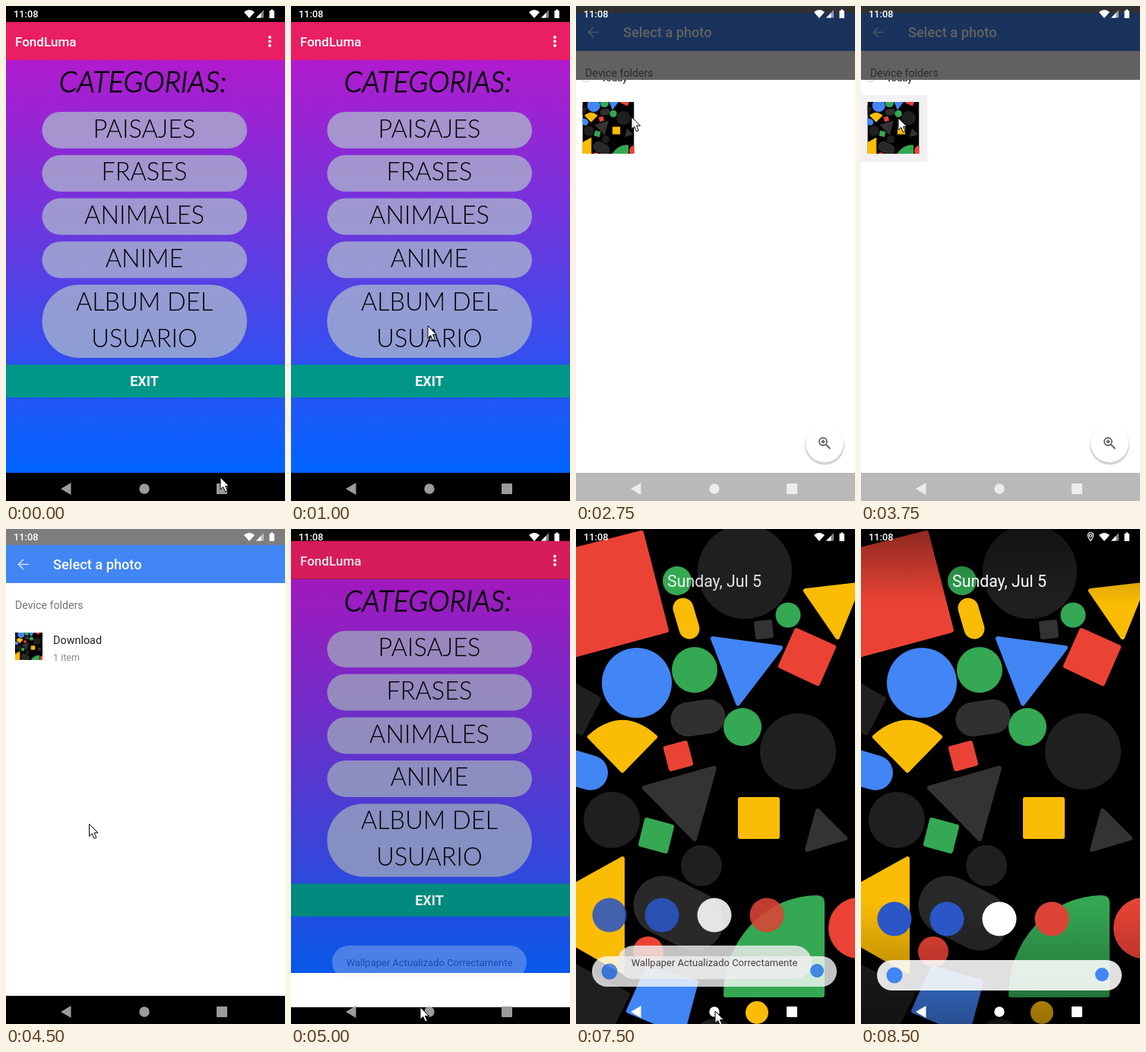
Recreate the animation shown at these times as an HTML page. Size 367 px wide and 650 px high, loop 8.75 s.

```html
<!DOCTYPE html>
<html lang="es">
<head>
<meta charset="utf-8">
<title>Wallpaper app</title>
<style>
html, body { margin: 0; width: 100%; height: 100%; overflow: hidden; background: #000; }
main { position: relative; width: 367px; height: 650px; overflow: hidden; }
main > svg { position: absolute; left: 0; top: 0; }
text { font-family: Roboto, sans-serif; white-space: pre; }
.mid { text-anchor: middle; }
.hand text { font: 300 32.5px Lato, sans-serif; }
.hand .head { font: italic 300 38px Lato, sans-serif; }
.med { font-weight: 500; }
</style>
</head>
<body>
<main>
<svg width="0" height="0">
  <defs>
    <linearGradient id="sky" x2="0" y2="1"><stop stop-color="#b01bce"/><stop offset=".45" stop-color="#643ae0"/><stop offset="1" stop-color="#0064ff"/></linearGradient>
    <linearGradient id="shade" x2="0" y2="1"><stop stop-opacity=".4"/><stop offset=".15" stop-opacity="0"/><stop offset=".75" stop-opacity="0"/><stop offset="1" stop-opacity=".4"/></linearGradient>
    <g id="wall" stroke-linejoin="round" stroke-linecap="round"></g>
    <symbol id="thumb" viewBox="0 177 367 367"><rect y="177" width="367" height="367"/><use href="#wall"/></symbol>
    <path id="back" d="M30 46.5H17M23 40l-6.500 6.500 6.500 6.500" fill="none" stroke-width="1.700"/>
  </defs>
</svg>

<svg id="home" width="367" height="650">
  <rect width="367" height="650"/>
  <use href="#wall"/>
  <rect id="scrim" width="367" height="650" fill="url(#shade)"/>
  <text id="date" class="mid" x="182" y="76" font-size="21.300" fill="#fff">Sunday, Jul 5</text>
  <g id="dock">
    <circle cx="44" cy="512" r="22.500" fill="#2a56c6"/>
    <circle cx="113" cy="512" r="22.500" fill="#2a56c6"/>
    <circle cx="182" cy="512" r="22.500" fill="#fff"/>
    <circle cx="251" cy="512" r="22.500" fill="#db4437"/>
    <rect x="21" y="566" width="322" height="40" rx="20" fill="#fff" opacity=".88"/>
    <circle cx="44" cy="586" r="10.500" fill="#4285f4"/>
    <circle cx="317" cy="585" r="9" fill="#4285f4"/>
  </g>
</svg>

<svg id="app" width="367" height="650">
  <rect width="367" height="650"/>
  <rect y="71" width="367" height="542" fill="url(#sky)"/>
  <rect y="21" width="367" height="50" fill="#e91e63"/>
  <text class="med" x="12" y="53" font-size="17" fill="#fff">FondLuma</text>
  <g fill="#fff"><circle cx="347" cy="41" r="2"/><circle cx="347" cy="46.500" r="2"/><circle cx="347" cy="52" r="2"/></g>
  <g id="menu" class="hand mid"><text class="head" x="180" y="113" stroke="#000" stroke-width=".9">CATEGORIAS:</text></g>
  <rect y="471" width="367" height="43" fill="#009688"/>
  <text class="mid" x="182" y="499" font-size="18" font-weight="700" fill="#fff">EXIT</text>
</svg>

<svg id="picker" width="367" height="650">
  <rect width="367" height="650"/>
  <rect width="367" height="613" fill="#fff"/>
  <rect width="367" height="21" fill="#7d7d7d"/>
  <rect y="21" width="367" height="50" fill="#4285f4"/>
  <use href="#back" stroke="#c6daff"/>
  <text class="med" x="62" y="53" font-size="18.200" fill="#fff">Select a photo</text>
  <text x="12" y="105" font-size="14.200" fill="#757575">Device folders</text>
  <rect id="press" y="126" width="367" height="56" fill="#e8e8e8"/>
  <use href="#thumb" x="12" y="136" width="36" height="36"/>
  <text x="62" y="151" font-size="14.400" fill="#212121">Download</text>
  <text x="62" y="173" font-size="12.500" fill="#8a8a8a">1 item</text>
</svg>

<svg id="page" width="367" height="650">
  <rect width="367" height="650" fill="#b9b9b9"/>
  <rect y="21" width="367" height="592" fill="#fff"/>
  <use href="#back" stroke="#757575"/>
  <text class="med" x="62" y="53" font-size="18.200" fill="#333">Download</text>
  <circle cx="13" cy="94" r="5.500" fill="none" stroke="#ccc"/>
  <text class="med" x="33" y="98.500" font-size="13" fill="#333">Today</text>
  <rect id="chosen" y="117" width="87" height="88" fill="#f1f1f3"/>
  <use href="#thumb" x="8.500" y="126" width="68" height="68"/>
  <circle cx="327" cy="576" r="26.500" opacity=".08"/>
  <circle cx="327" cy="577" r="25.500" opacity=".1"/>
  <circle cx="327" cy="574" r="25" fill="#fff"/>
  <path d="M329 576l5.500 5.500M322.500 572h5M325 569.500v5" stroke="#666" stroke-width="1.800"/>
  <circle cx="325" cy="572" r="5" fill="none" stroke="#666" stroke-width="1.800"/>
</svg>

<svg id="system" width="367" height="650">
  <g fill="#fff">
    <text class="med" x="10" y="15" font-size="12.800">11:08</text>
    <path d="M313 8Q320 2 327 8L320 16Z"/>
    <path d="M339 5V15.500H329Z" opacity=".5"/><path d="M335.500 9V15.500H329Z"/>
    <path d="M346.500 6H348.500V4.500H351V6H353V16H346.500Z"/>
    <path id="pin" d="M302 15.500C294 5 302 4.500 302 4.500S310 5 302 15.500ZM302 7a1.700 1.700 0 1 0 .01 0Z" fill="none" stroke="#fff" stroke-width="1.200"/>
  </g>
  <ellipse id="ripple" cx="182" cy="632" fill="#fff" opacity=".16"/>
  <g id="nav"><path d="M72 634L85.500 626V642Z"/><circle cx="182" cy="634" r="6.700"/><rect x="277" y="627" width="14" height="14" rx="1"/></g>
  <g id="toast">
    <rect x="54" y="547" width="256" height="44" rx="22" fill="#eee" opacity=".91"/>
    <text class="mid" x="182" y="574" font-size="13" fill="#333">Wallpaper Actualizado Correctamente</text>
  </g>
  <path id="cursor" d="M0 0V16L3.700 12.500 6.500 19 9.300 17.800 6.600 11.500H11.500Z" fill="#fff" stroke="#000"/>
</svg>
</main>

<script>
const $ = id => document.getElementById(id);
const RED = '#ea4335', BLUE = '#4285f4', GREEN = '#34a853', GOLD = '#fbbc05', DARK = '#1f1f1f', GREY = '#333';

// Wallpaper shapes
const dot = (c, x, y, r) => `<circle cx="${x}" cy="${y}" r="${r}" fill="${c}"/>`;
const path = (c, d) => `<path d="${d}" fill="${c}" stroke="${c}" stroke-width="6"/>`;
const poly = (c, pts) => path(c, `M${pts}Z`);
const pill = (c, d, w) => `<path d="${d}" stroke="${c}" stroke-width="${w}"/>`;
$('wall').innerHTML = [
  dot(DARK, 222, 56, 62), dot(DARK, 292, 292, 50), dot(DARK, 47, 382, 37), dot(DARK, 165, 442, 27), dot(DARK, 182, 670, 27),
  poly(DARK, '-5 203 30 223 7 268 -10 260'), poly(DARK, '-5 572 68 611 46 655 -10 655'),
  poly(RED, '-40 37 86 5 119 133 -40 176'),
  dot(GREEN, 133, 68, 19), pill(GOLD, 'M141 104L149 131', 27),
  poly(GOLD, '302 81 372 73 344 142'), dot(GREEN, 279, 113, 16.5),
  poly(GREY, '237 124 255 122 257 140 239 142'),
  poly(RED, '290 133 339 155 318 203 269 180'),
  dot(BLUE, 80, 202, 46), dot(GREEN, 156, 185, 30),
  poly(BLUE, '180 144 269 156 213 229'),
  pill('#303030', 'M147 250L174 246', 45), dot(GREEN, 219, 260, 25),
  path(GOLD, 'M18 273Q61 235 104 273L61 317Z'),
  pill(BLUE, 'M-15 310L19 320', 46),
  poly(RED, '118 288 144 281 151 308 125 315'),
  poly(GREY, '90 340 182 314 156 407'),
  path(GOLD, 'M216 355H265V404H216Z'),
  poly(GREY, '318 370 354 406 304 421'),
  poly(GREEN, '93 382 126 391 118 423 85 414'),
  poly(GOLD, '61 433 61 581 -70 506'),
  pill('#292929', 'M114 494L156 515', 77),
  path(GREEN, 'M197 612A121 128 0 0 1 316 484Q324 484 324 490V612Z'),
  dot(RED, 372, 524, 40), dot(RED, 95, 555, 20),
  poly(BLUE, '94 577 158 595 140 662 69 633'),
  dot(GOLD, 238, 635, 15)
].join('');

// Category buttons
[['PAISAJES'], ['FRASES'], ['ANIMALES'], ['ANIME'], ['ALBUM DEL', 'USUARIO']].forEach((lines, i) => {
  const y = 139 + i * 56.75, h = 48 * lines.length;
  $('menu').innerHTML += `<rect x="47.500" y="${y}" width="269.500" height="${h}" rx="${h / 2}" fill="#acb8cd" opacity=".75"/>` +
    lines.map((s, k) => `<text x="182" y="${y + 33.5 + k * 48}">${s}</text>`).join('');
});

const lerp = (keys, t) => {
  let i = 1;
  while (i < keys.length - 1 && t > keys[i][0]) i++;
  const a = keys[i - 1], b = keys[i];
  const k = Math.min(1, Math.max(0, (t - a[0]) / (b[0] - a[0])));
  return a.slice(1).map((v, j) => v + (b[j + 1] - v) * k);
};

// Each scene lists its layers: [id, shift, brightness, clip from top]
const scenes = [
  [0, ['app']],
  [1500, ['app', -12, .45], ['picker', 6, 1, 130]],
  [1750, ['picker']],
  [2750, ['picker', -12, .38], ['page', 0, 1, 97]],
  [3000, ['page']],
  [3750, ['picker', -12, .38], ['page', 0, 1, 97]],
  [4000, ['picker']],
  [5000, ['app', -5.3, .92], ['picker', 15, 1, 568]],
  [5250, ['app']],
  [7500, ['home']]
];
const moves = [[250, 282, 619], [1000, 180, 420], [1250, 180, 420], [2000, 85, 145], [2500, 85, 145], [3250, 49, 147],
  [4000, 49, 147], [5000, 170, 628], [6000, 183, 629], [7250, 183, 629], [7500, 183, 633]];
const toastFade = [[4750, 0], [5000, .3], [5250, 1], [7250, 1], [7500, .9], [8000, 0]];

const show = (id, on) => $(id).style.visibility = on ? 'visible' : 'hidden';

function draw(t) {
  const layers = scenes.filter(s => s[0] <= t).pop().slice(1);
  for (const id of ['home', 'app', 'picker', 'page']) {
    const layer = layers.find(l => l[0] === id), st = $(id).style;
    st.display = layer ? 'block' : 'none';
    if (!layer) continue;
    const [, y = 0, light = 1, clip = 0] = layer;
    st.transform = `translateY(${y}px)`;
    st.filter = light < 1 ? `brightness(${light})` : 'none';
    st.clipPath = clip ? `inset(${clip}px 0 0 0)` : 'none';
  }
  const settle = lerp([[7500, 0], [8000, 1]], t)[0];
  $('dock').setAttribute('transform', `translate(0 ${-5 * (1 - settle)})`);
  $('dock').style.opacity = $('date').style.opacity = .88 + .12 * settle;
  $('scrim').style.opacity = lerp([[7500, 0], [8500, 1]], t)[0];
  $('press').style.opacity = t === 2500 ? 1 : 0;
  $('chosen').style.opacity = t >= 3500 ? 1 : 0;

  const onPage = t >= 2750 && t < 4000;
  const tone = onPage ? 236 : lerp([[6250, 155], [7500, 255]], t)[0];
  $('nav').setAttribute('fill', `rgb(${tone},${tone},${tone})`);
  const grow = lerp([[6250, 0], [7000, 1]], t)[0];
  $('ripple').setAttribute('rx', 50 * grow);
  $('ripple').setAttribute('ry', 17 * grow);
  show('ripple', t > 6250 && t < 7500);
  $('toast').style.opacity = lerp(toastFade, t)[0];
  show('pin', t >= 8250);
  show('cursor', t < 8250);
  $('cursor').setAttribute('transform', `translate(${lerp(moves, t)})`);
}

const start = performance.now();
function tick() {
  const t = (performance.now() - start) % 8750;
  draw(Math.floor(t / 250) * 250);
  requestAnimationFrame(tick);
}
tick();
</script>
</body>
</html>
```
